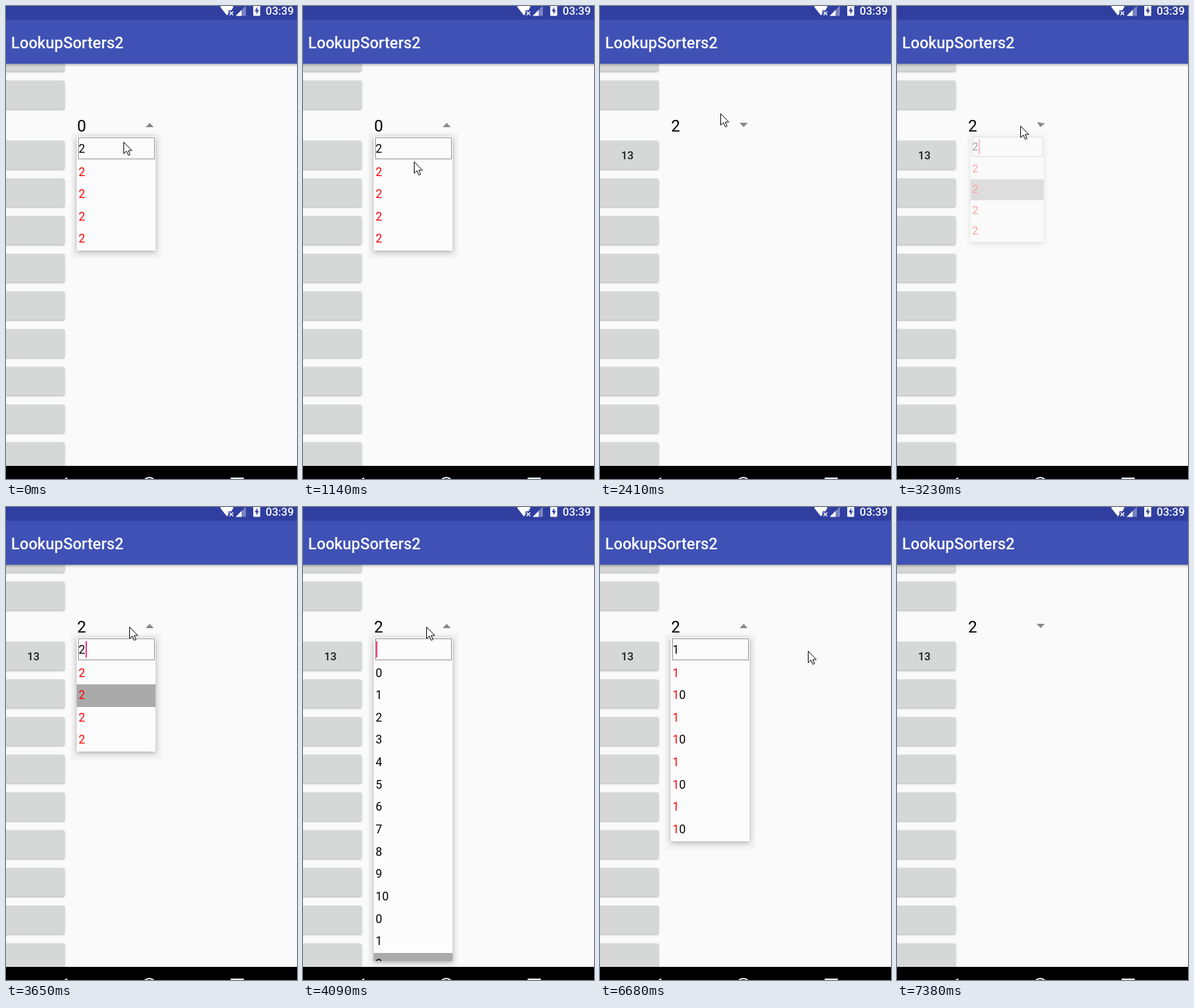
Recreate the animation shown at these times as an HTML page. Size 399 by 648 pixels, loop 8.98 s.

```html
<!DOCTYPE html>
<html lang="en">
<head>
<meta charset="utf-8">
<title>Search dropdown</title>
<style>
  html, body { margin: 0; width: 100%; height: 100%; overflow: hidden; background: #fafafa; }
  body { position: relative; font-family: Roboto, "Liberation Sans", sans-serif; }
  svg { position: absolute; left: 0; top: 0; display: block; }
  .medium { font-weight: 500; }
  #buttons { fill: #d6d7d7; filter: drop-shadow(0 1px 1px rgba(0, 0, 0, .3)); }
  #popup {
    position: absolute; left: 97px; top: 179px; width: 108px;
    background: #fcfcfc; transform-origin: 53px -17px;
    box-shadow: 0 3px 1px 8px rgba(0, 0, 0, .025), 0 2px 7px rgba(0, 0, 0, .3);
    font-size: 16px; color: #000;
  }
  #field {
    position: absolute; left: 2px; top: 1px; width: 105px; height: 30px;
    box-sizing: border-box; border: 1px solid #999;
    line-height: 30px; text-indent: -.5px;
  }
  #caret { position: absolute; top: 5px; width: 2.5px; height: 22px; background: #ff4081; }
  #list { position: absolute; left: 0; right: 0; top: 33.5px; bottom: 0; overflow: hidden; }
  #list div { height: 30.65px; line-height: 30.65px; padding-left: 2.5px; }
  #list .picked { background: #aaa; }
  #list b { font-weight: 400; color: #f00; }
</style>
</head>
<body>
<svg width="399" height="648" viewBox="0 0 399 648">
  <defs>
    <linearGradient id="drop" x1="0" y1="0" x2="0" y2="1">
      <stop offset="0" stop-opacity=".28"/>
      <stop offset="1" stop-opacity="0"/>
    </linearGradient>
  </defs>
  <g id="buttons"></g>
  <rect y="79" width="399" height="4" fill="url(#drop)"/>
  <rect width="399" height="79" fill="#3f51b5"/>
  <rect width="399" height="19" fill="#303f9f"/>
  <text class="medium" x="7" y="57.5" font-size="21.5" fill="#fff">LookupSorters2</text>

  <g fill="#fff">
    <path d="M293.5 1Q303 -5 312 1L309 6H305V10L303 13Z"/>
    <path d="M306.5 7.5l5 5m0-5l-5 5" stroke="#fff" stroke-width="1.4"/>
    <path d="M315 13.5L329 -.5V13.5Z" opacity=".35"/>
    <path d="M315 13.5L323 5.5V13.5Z"/>
    <rect x="339" y="-2" width="9.5" height="15.5" rx="1"/>
    <path d="M344.6 1L341 7.2H343.4V11.5L347 5.6H344.6Z" fill="#303f9f"/>
    <text class="medium" x="356" y="12" font-size="15.2">03:39</text>
  </g>

  <text id="value" class="medium" x="37.5" y="210.3" font-size="15" text-anchor="middle" fill="#1c1c1c"></text>
  <text id="label" x="97.4" y="172" font-size="22"></text>
  <path id="arrow" d="M191.5 160H202.5L197 166Z" fill="#888"/>

  <rect y="630" width="399" height="18" fill="#000"/>
  <g fill="none" stroke="#eee" stroke-width="2">
    <path d="M84 645.5L69 654.5L84 663Z" fill="#eee" stroke="none"/>
    <circle cx="196.5" cy="654.5" r="8.5"/>
    <rect x="309" y="647" width="16" height="16"/>
  </g>
</svg>

<div id="popup">
  <div id="field"></div>
  <div id="caret"></div>
  <div id="list"></div>
</div>

<svg id="cursor" width="14" height="21" viewBox="0 0 14 21">
  <path d="M.5 .5V16.2L4.2 12.8L6.8 18.6L9.2 17.5L6.7 12H11.6Z" fill="#fff" stroke="#111" stroke-width="1"/>
</svg>

<script>
  const LOOP = 8980, ROW = 30.65, HEAD = 33.5, MAX_HEIGHT = 443;
  const BUTTON_HEIGHT = 38.9, BUTTON_PITCH = 51.65;
  const $ = id => document.getElementById(id);

  // Each entry changes only the listed properties and holds until the next one.
  const steps = [
    [0, { cursor: [161, 186], label: '0', value: '', query: '2', caret: false,
          alpha: 1, scale: 1, turn: 180, picked: -1, tall: false }],
    [120, { cursor: null }],
    [430, { caret: true }],
    [990, { cursor: [162, 187], caret: false }],
    [1140, { cursor: [152, 213] }],
    [1290, { cursor: [150, 229] }],
    [1410, { cursor: [149, 241] }],
    [1530, { cursor: [149, 249], caret: true }],
    [1800, { picked: 1 }],
    [1940, { label: '2', value: '13', alpha: .5, turn: 120, caret: false }],
    [2080, { alpha: 0, turn: 30 }],
    [2240, { cursor: [158, 190], turn: 0 }],
    [2410, { cursor: [165, 147] }],
    [2530, { cursor: [165, 151] }],
    [2660, { cursor: [166, 162] }],
    [2800, { cursor: [166, 171] }],
    [2950, { cursor: [169, 164] }],
    [3230, { alpha: .35, scale: .93, turn: 10, caret: true }],
    [3380, { alpha: 1, scale: 1, turn: 90 }],
    [3520, { turn: 180 }],
    [3810, { caret: false }],
    [4090, { query: '', picked: 13, caret: true }],
    [4490, { query: '1', picked: -1, tall: true }],
    [4740, { tall: false }],
    [5140, { caret: false }],
    [5730, { caret: true }],
    [6010, { cursor: [196, 169] }],
    [6140, { cursor: [236, 178] }],
    [6270, { cursor: [268, 186], caret: false }],
    [6400, { cursor: [282, 189] }],
    [6680, { cursor: [285, 197] }],
    [6820, { cursor: [291, 222], caret: true }],
    [6960, { cursor: [296, 246] }],
    [7100, { cursor: [298, 258], alpha: .6, turn: 165 }],
    [7240, { alpha: 0, turn: 60 }],
    [7380, { cursor: null, turn: 0 }]
  ];

  const items = Array.from({ length: 44 }, (_, i) => String(i % 11));

  function buttonShape(y) {
    return `<rect x="-20" y="${y}" width="100.3" height="${BUTTON_HEIGHT}" rx="2"/>`;
  }
  const above = [0, 1].map(i => buttonShape(50.6 + i * BUTTON_PITCH));
  const below = Array.from({ length: 9 }, (_, i) => buttonShape(184.5 + i * BUTTON_PITCH));
  $('buttons').innerHTML = [...above, ...below].join('');

  function drawPopup(s) {
    const found = items.filter(item => item.includes(s.query));
    const mark = item => s.query ? item.replace(s.query, '<b>$&</b>') : item;
    $('list').innerHTML = found.slice(0, 14).map((item, i) =>
      `<div${i === s.picked ? ' class="picked"' : ''}>${mark(item)}</div>`).join('');
    $('field').textContent = s.query;
    $('caret').style.left = 2.6 + 9 * s.query.length + 'px';
    $('caret').style.visibility = s.caret ? 'inherit' : 'hidden';

    const style = $('popup').style;
    style.height = (s.tall ? MAX_HEIGHT : Math.min(MAX_HEIGHT, HEAD + found.length * ROW)) + 'px';
    style.opacity = s.alpha;
    style.visibility = s.alpha ? 'visible' : 'hidden';
    style.transform = s.scale === 1 ? 'none' : `scale(${s.scale})`;
  }

  function draw(s) {
    $('label').textContent = s.label;
    $('value').textContent = s.value;
    $('arrow').setAttribute('transform', `rotate(${s.turn} 197 163)`);
    drawPopup(s);
    const cursor = $('cursor').style;
    cursor.visibility = s.cursor ? 'visible' : 'hidden';
    if (s.cursor) {
      cursor.left = s.cursor[0] + 'px';
      cursor.top = s.cursor[1] + 'px';
    }
  }

  const start = performance.now();
  let shown = 0;

  function tick() {
    const t = (performance.now() - start) % LOOP;
    const passed = steps.filter(([at]) => at <= t);
    if (passed.length !== shown) {
      shown = passed.length;
      draw(Object.assign({}, ...passed.map(([, change]) => change)));
    }
    requestAnimationFrame(tick);
  }
  tick();
</script>
</body>
</html>
```
